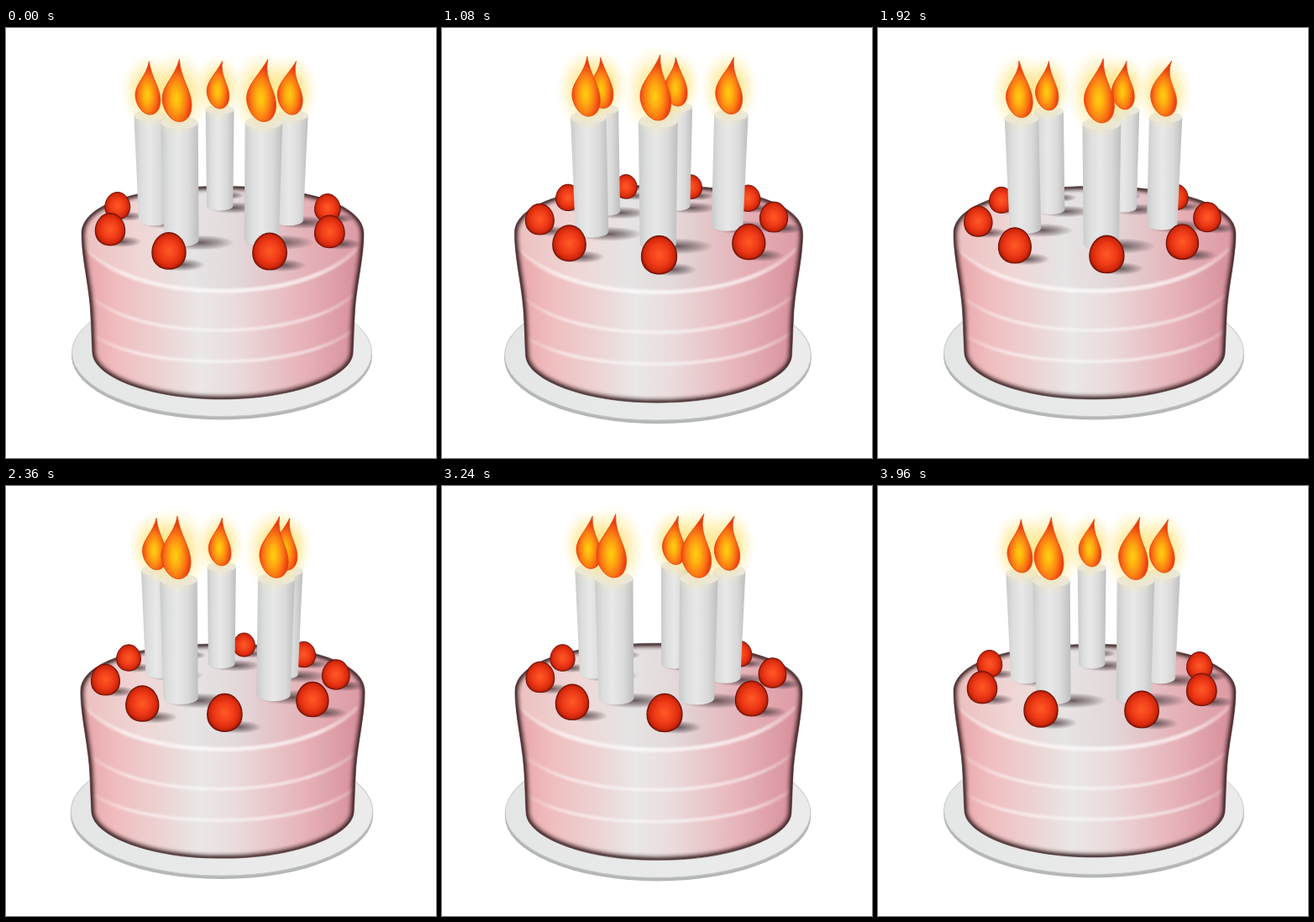
Recreate the animation shown at these times as an HTML page. Size 512 by 512 pixels, loop 4 s.

```html
<!DOCTYPE html>
<html lang="en">
<head>
<meta charset="utf-8">
<title>Birthday cake</title>
<style>
html, body { margin: 0; width: 100%; height: 100%; overflow: hidden; background: #fff; }
svg { display: block; width: 100%; height: 100%; }
</style>
</head>
<body>
<svg viewBox="0 0 512 512">
  <defs>
    <linearGradient id="side">
      <stop offset="0" stop-color="#e5a3a6"/>
      <stop offset=".12" stop-color="#f0bcbe"/>
      <stop offset=".3" stop-color="#ecd5d5"/>
      <stop offset=".42" stop-color="#eae7e7"/>
      <stop offset=".54" stop-color="#ebdcdd"/>
      <stop offset=".78" stop-color="#e7b3b9"/>
      <stop offset="1" stop-color="#d58c98"/>
    </linearGradient>
    <linearGradient id="top">
      <stop offset="0" stop-color="#ecbcbc"/>
      <stop offset=".22" stop-color="#efd6d5"/>
      <stop offset=".4" stop-color="#e6e4e4"/>
      <stop offset=".55" stop-color="#e3d9da"/>
      <stop offset=".8" stop-color="#e5b0b6"/>
      <stop offset="1" stop-color="#dc98a3"/>
    </linearGradient>
    <linearGradient id="plate" x2="1" y2=".3">
      <stop offset="0" stop-color="#e3e5e5"/>
      <stop offset="1" stop-color="#ebebeb"/>
    </linearGradient>
    <linearGradient id="line">
      <stop offset="0" stop-color="#fff" stop-opacity=".15"/>
      <stop offset=".15" stop-color="#fff" stop-opacity=".65"/>
      <stop offset=".85" stop-color="#fff" stop-opacity=".65"/>
      <stop offset="1" stop-color="#fff" stop-opacity=".2"/>
    </linearGradient>
    <linearGradient id="wax">
      <stop offset="0" stop-color="#c9caca"/>
      <stop offset=".2" stop-color="#dcdddd"/>
      <stop offset=".45" stop-color="#e8e8e8"/>
      <stop offset=".75" stop-color="#dadada"/>
      <stop offset="1" stop-color="#bebebe"/>
    </linearGradient>
    <radialGradient id="berry" cx=".5" cy=".5" r=".54">
      <stop offset="0" stop-color="#ff5a26"/>
      <stop offset=".5" stop-color="#f03c18"/>
      <stop offset=".8" stop-color="#d4280c"/>
      <stop offset="1" stop-color="#7d1205"/>
    </radialGradient>
    <radialGradient id="fire" cx=".48" cy=".63" r=".5">
      <stop offset="0" stop-color="#ffd010"/>
      <stop offset=".32" stop-color="#ffae10"/>
      <stop offset=".66" stop-color="#fb7a14"/>
      <stop offset="1" stop-color="#ea3e10"/>
    </radialGradient>
    <radialGradient id="glow">
      <stop offset="0" stop-color="#ffd54a" stop-opacity=".85"/>
      <stop offset=".5" stop-color="#ffe27a" stop-opacity=".55"/>
      <stop offset="1" stop-color="#fff3b8" stop-opacity="0"/>
    </radialGradient>
    <radialGradient id="shade">
      <stop offset="0" stop-color="#3c2c30" stop-opacity=".75"/>
      <stop offset=".55" stop-color="#4c3c40" stop-opacity=".4"/>
      <stop offset="1" stop-color="#4c3c40" stop-opacity="0"/>
    </radialGradient>
    <filter id="soft" x="-10%" y="-10%" width="120%" height="120%"><feGaussianBlur stdDeviation="2.8"/></filter>
    <filter id="haze" x="-10%" y="-40%" width="120%" height="180%"><feGaussianBlur stdDeviation="1"/></filter>
    <path id="body" d="M90 245C90 212 150 188.500 257 188.500S426 212 426 245C426 276 416 310 415 345C414 362 414 374 413 388C410 416 342 442 257 442S106 416 103 388C102 374 102 362 101 345C100 310 90 276 90 245Z"/>
    <clipPath id="inside"><use href="#body"/></clipPath>
  </defs>
  <g id="cake">
    <ellipse cx="257" cy="390.5" rx="179" ry="76" fill="#b4b6b7"/>
    <ellipse cx="257" cy="386.5" rx="178.5" ry="76" fill="url(#plate)" stroke="#c6c8ca"/>
    <use href="#body" fill="url(#side)"/>
    <g clip-path="url(#inside)">
      <path d="M85 245C95 292 190 311 257 311S418 294 428 245V185H85Z" fill="url(#top)"/>
      <g fill="none" stroke="url(#line)" stroke-width="5" filter="url(#haze)">
        <path d="M97 266C130 297 190 313 257 313S385 297 418 263"/>
        <path d="M101 320C135 349 195 360 257 360S382 346 415 317" stroke-width="4" opacity=".8"/>
        <path d="M104 366C140 389 195 397 257 397S378 386 413 360" stroke-width="4" opacity=".8"/>
      </g>
      <use href="#body" fill="none" stroke="#2c1519" stroke-width="6.500" filter="url(#soft)"/>
    </g>
    <use href="#body" fill="none" stroke="#4b3236" stroke-opacity=".55" stroke-width="1"/>
    <g id="decor"></g>
  </g>
</svg>
<script>
const cake = document.getElementById('cake');
const decor = document.getElementById('decor');
const STEP = 40, STEPS = 100, TURN = STEPS - 1, MID = 256;
const rad = deg => deg * Math.PI / 180;
const f = v => v.toFixed(2);

const berries = [20, 59, 99, 140, 180, 216, 257, 297.5, 338.5];

// Sway of each flame tip, in px, at the moments listed in swayAt.
const swayAt = [0, 17, 36, 48, 69, 81, 99];
const candles = [
  { angle: -99, sway: [-1, -10, 4, 7, 1, 2] },
  { angle: -33, sway: [0, -6, -1, 2, 4, 6] },
  { angle: 181, sway: [3, 2, 4, 2, -4, 2] },
  { angle: 34, sway: [5, -3, 0, 0, 1, 6] },
  { angle: 99, sway: [5, 9, -3, -3, 2, 3] }
];

function swayOf(keys, n) {
  let i = 0;
  while (i < keys.length - 1 && n >= swayAt[i + 1]) i++;
  const p = (n - swayAt[i]) / (swayAt[i + 1] - swayAt[i]);
  const e = (1 - Math.cos(Math.PI * p)) / 2;
  return keys[i] + (keys[(i + 1) % keys.length] - keys[i]) * e;
}

const oval = (x, y, rx, ry, fill) =>
  `<ellipse cx="${f(x)}" cy="${f(y)}" rx="${f(rx)}" ry="${f(ry)}" fill="${fill}"/>`;

function berry(angle) {
  const c = Math.cos(angle), s = 1 / (1 - 0.23 * c);
  const x = MID + 133 * Math.sin(angle) * s, y = 53 + 167 * s;
  const egg = 'M0-17.2C9.500-17.2 15.8-7.500 15.8 1.500C15.8 11 9 17 0 17S-15.8 11-15.8 1.500C-15.8-7.500-9.500-17.2 0-17.2Z';
  return {
    depth: c,
    shadow: oval(x + 12 * s, y + 13 * s, 22 * s, 6 * s, 'url(#shade)'),
    shape: `<path d="${egg}" transform="translate(${f(x)} ${f(y)}) scale(${f(s)})" fill="url(#berry)" stroke="#761307" stroke-width="1"/>`,
    glow: '', flame: ''
  };
}

// The base sits right of the bulge, so the flame curls like a comma.
function flame(x, y, s, tip) {
  const w = 15.3 * s, h = 65 * s, bend = tip * 0.4, mid = -2.5 * s;
  const left = mid - w, right = mid + w;
  const d = `M0 0C${f(-w * .6)} 0 ${f(left)} ${f(-h * .2)} ${f(left)} ${f(-h * .37)}` +
    `C${f(left)} ${f(-h * .58)} ${f(-w * .3 - bend)} ${f(-h * .72)} ${f(tip)} ${f(-h)}` +
    `C${f(w * .1 - bend)} ${f(-h * .68)} ${f(right)} ${f(-h * .5)} ${f(right)} ${f(-h * .27)}` +
    `C${f(right)} ${f(-h * .1)} ${f(w * .5)} 0 0 0Z`;
  return `<path d="${d}" transform="translate(${f(x)} ${f(y)})" fill="url(#fire)" stroke="#e2460f" stroke-width=".8" stroke-linejoin="round"/>`;
}

function candle(angle, tip) {
  const c = Math.cos(angle), s = 1 / (1 - 0.15 * c);
  const off = Math.sin(angle) / (1 - 0.06 * c);
  const x1 = MID + 86.5 * off, x2 = MID + 82 * off;
  const y1 = 105.5 + 8.5 * c, y2 = 239 + 23.5 * c + 2 * c * c;
  const r1 = 19.5 * s, r2 = 18 * s, v = 6.6 * s;
  const d = `M${f(x1 - r1)} ${f(y1)}L${f(x2 - r2)} ${f(y2 - v)}` +
    `A${f(r2)} ${f(v)} 0 0 0 ${f(x2 + r2)} ${f(y2 - v)}L${f(x1 + r1)} ${f(y1)}Z`;
  return {
    depth: 0.61 * c,
    shadow: oval(x2 + 19 * s, y2 - 4 * s, 36 * s, 8 * s, 'url(#shade)'),
    shape: `<path d="${d}" fill="url(#wax)"/>` + oval(x1, y1, r1, v, '#e6e6e5'),
    glow: oval(x1 - 2, y1 - 30 * s, 34 * s, 46 * s, 'url(#glow)'),
    flame: flame(x1, y1 - 1, s, tip)
  };
}

function draw(n) {
  const p = n / TURN, turn = -360 * p;
  const zoom = 1 + 0.011 * (1 - Math.cos(4 * Math.PI * p));
  cake.setAttribute('transform', `translate(257 250) scale(${zoom.toFixed(4)}) translate(-257 -250)`);
  const items = [
    ...berries.map(a => berry(rad(a + turn))),
    ...candles.map(k => candle(rad(k.angle + turn), swayOf(k.sway, n)))
  ].sort((a, b) => a.depth - b.depth);
  const layer = key => items.map(i => i[key]).join('');
  decor.innerHTML = `<g clip-path="url(#inside)">${layer('shadow')}</g>` +
    layer('shape') + layer('glow') + layer('flame');
}

const start = performance.now();
let last = -1;
function tick() {
  const n = Math.floor(Math.max(0, performance.now() - start) / STEP) % STEPS;
  if (n !== last) draw(last = n);
  requestAnimationFrame(tick);
}
tick();
</script>
</body>
</html>
```
